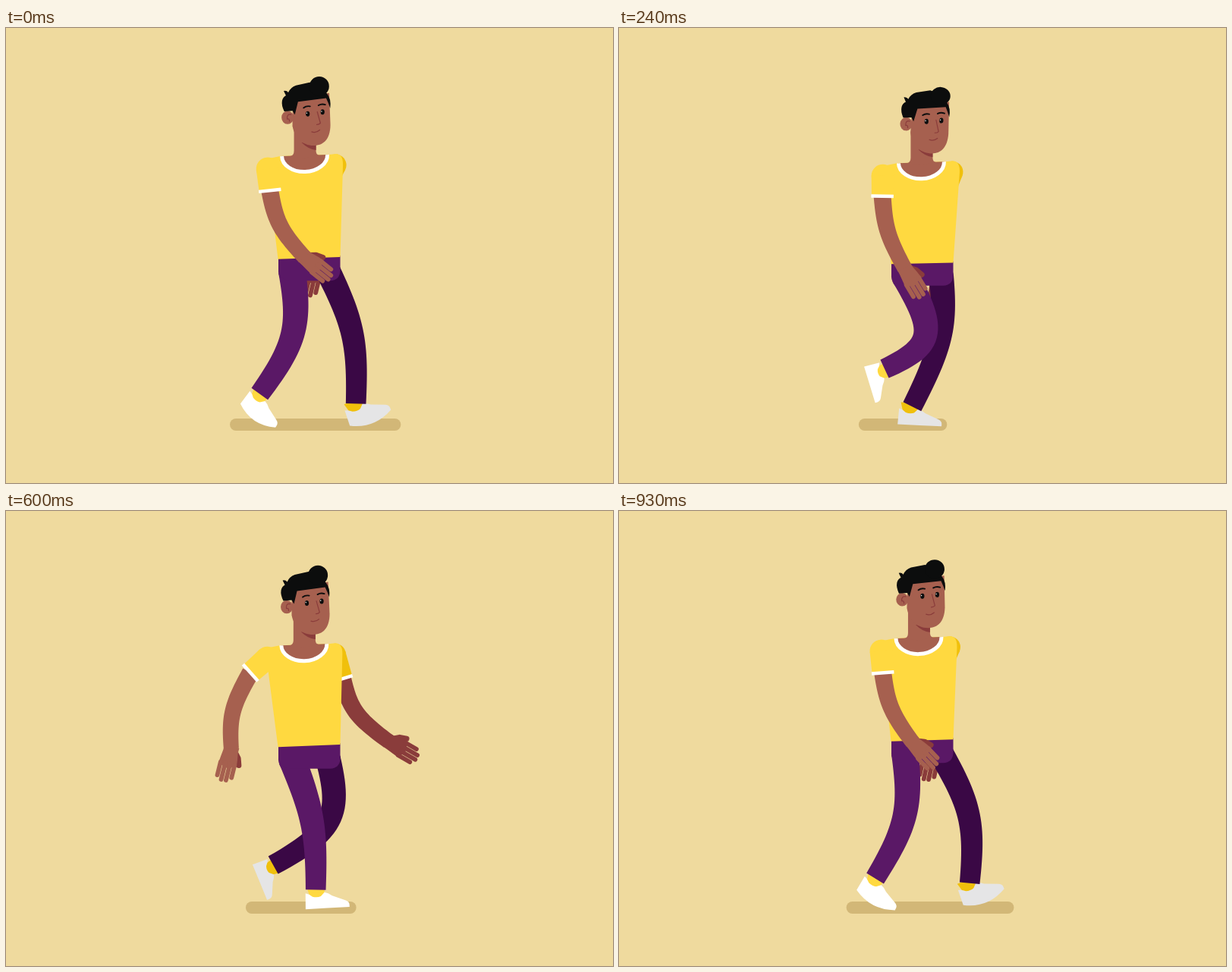
An HTML page with a canvas that plays this animation: 800x600 px, repeating every 0.96 s.

```html
<!DOCTYPE html>
<html lang="en">
<head>
<meta charset="utf-8">
<title>Walk cycle</title>
<style>
html, body { margin: 0; width: 800px; height: 600px; overflow: hidden; background: #efda9e; }
canvas { display: block; }
</style>
</head>
<body>
<canvas id="stage" width="800" height="600"></canvas>
<script>
const ctx = document.getElementById('stage').getContext('2d');
const LOOP = 960, HALF = LOOP / 2, STEP = 30, RAD = Math.PI / 180;
const C = {
  bg: '#efda9e', ground: '#d2b777', skin: '#a6604f', skinDark: '#8a3c3b',
  shirt: '#ffd940', shirtDark: '#f0c00c', pants: '#5a1866', pantsDark: '#3a0845',
  white: '#ffffff', shoeDark: '#e5e5e6', hair: '#0c0d0d'
};

// Cosine that reaches 1 at the time `peak`.
const wave = (t, period, peak) => Math.cos(2 * Math.PI * (t - peak) / period);

// Sum of harmonics of the loop; each pair holds a cosine and a sine weight.
function harmonics(t, mean, ...pairs) {
  const w = 2 * Math.PI * t / LOOP;
  return pairs.reduce((sum, [a, b], i) => sum + a * Math.cos((i + 1) * w) + b * Math.sin((i + 1) * w), mean);
}

// One leg's stride; both legs share it half a loop apart.
function stride(t) {
  return {
    knee: [
      harmonics(t, 397.6, [-23.2, 9.8], [2, -3.2], [1.2, 1.8]),
      harmonics(t, 405.5, [.7, -2.6], [-2, 4])
    ],
    ankle: [
      harmonics(t, 371.5, [-51, -7.7], [13.8, -4.8]),
      harmonics(t, 481, [-2.1, -23.1], [6.5, 4], [-2.9, 1.9])
    ],
    footAngle: harmonics(t, 22, [24.4, 30.4], [-16, 7.8], [3.6, -4.6]),
    bulge: Math.max(0, 8 * wave(t, HALF, 0))
  };
}

// One arm's pose from its swing (1 forward, -1 back) and the body bob.
function armPose(swing, bob) {
  const curve = (a, b, c) => a + b * swing + c * swing * swing;
  return {
    cuff: [curve(342.5, 13, -8), curve(217, 4, -3.5) + 5 * bob],
    elbow: [curve(339.5, 33, -8.5), curve(267, 1, -6) + 4.6 * bob],
    wrist: [curve(348.5, 53, 0), curve(321, -5, -16) + 4 * bob],
    handAngle: curve(84, -38, -18)
  };
}

const shift = ([x, y], dx) => [x + dx, y];

function fill(color, path) {
  ctx.fillStyle = color;
  ctx.fill(new Path2D(path));
}

function stroke(color, width, path, cap = 'round') {
  ctx.strokeStyle = color;
  ctx.lineWidth = width;
  ctx.lineCap = cap;
  ctx.lineJoin = 'round';
  ctx.stroke(new Path2D(path));
}

function ellipse(color, x, y, rx, ry = rx) {
  ctx.fillStyle = color;
  ctx.beginPath();
  ctx.ellipse(x, y, rx, ry, 0, 0, 2 * Math.PI);
  ctx.fill();
}

function local(x, y, degrees, draw) {
  ctx.save();
  ctx.translate(x, y);
  ctx.rotate(degrees * RAD);
  draw();
  ctx.restore();
}

// Outline of a tapered bent limb from a to b through mid, and its end direction.
function limb(a, mid, b, w0, w1) {
  const f = .85, steps = 28, left = [], right = [];
  const axes = [0, 1].map(i => {
    const k = (mid[i] - (.125 + .375 * (1 - f)) * (a[i] + b[i])) / (.75 * f);
    return [a[i], a[i] + f * (k - a[i]), b[i] + f * (k - b[i]), b[i]];
  });
  let dir;
  for (let s = 0; s <= steps; s++) {
    const u = s / steps, v = 1 - u, w = w0 + (w1 - w0) * u;
    const [x, y] = axes.map(p => v ** 3 * p[0] + 3 * v * v * u * p[1] + 3 * v * u * u * p[2] + u ** 3 * p[3]);
    const [dx, dy] = axes.map(p => v * v * (p[1] - p[0]) + 2 * v * u * (p[2] - p[1]) + u * u * (p[3] - p[2]));
    const len = Math.hypot(dx, dy) || 1;
    dir = [dx / len, dy / len];
    left.push([x - dir[1] * w, y + dir[0] * w]);
    right.unshift([x + dir[1] * w, y - dir[0] * w]);
  }
  return { path: 'M' + left.concat(right).join('L') + 'Z', dir };
}

function makeLeg(hip, pose, width) {
  const { path, dir } = limb(hip, pose.knee, pose.ankle, width, 13.3);
  const angle = pose.footAngle, cos = Math.cos(angle * RAD), sin = Math.sin(angle * RAD);
  const squash = 1 - .25 * Math.max(0, sin - .4);
  const joint = pose.ankle.map((v, i) => v + 10 * dir[i]);
  const footX = [[-13, -6], [-14, 15], [44, 13]].map(([x, y]) => joint[0] + x * squash * cos - y * sin);
  return { hip, path, width, joint, angle, squash, footX, bulge: pose.bulge };
}

function drawLeg(leg, pants, shoe, sock) {
  local(...leg.joint, leg.angle, () => {
    ctx.scale(leg.squash, 1);
    fill(sock, 'M-11-14L13-14L11 0L-7 1Z');
    fill(shoe, `M-13-6Q-8-5-4-1Q2 1 7-1L12-6Q17-5 22-1L39 6Q44 8 44 12L44 15Q15 ${15 + 2 * leg.bulge}-14 15Z`);
  });
  ellipse(pants, ...leg.hip, leg.width);
  fill(pants, leg.path);
}

function drawShadow(legs) {
  const xs = legs.flatMap(leg => leg.footX);
  const left = Math.min(...xs), right = Math.max(...xs), pad = (right - left) * .07;
  ctx.fillStyle = C.ground;
  ctx.beginPath();
  ctx.roundRect(left - pad, 515, right - left + 2 * pad, 16, 8);
  ctx.fill();
}

function hand(x, y, angle, skin) {
  local(x, y, angle, () => {
    stroke(C.skinDark, 7, 'M3-6L10-12L19-15');
    fill(skin, 'M-3-10L4-10Q14-12 22-12.5L26 0L22 12Q12 11 4 10L-3 9.5Z');
    stroke(skin, 5.8, 'M20-9.5L37-9.5M20-3.2L42-3.2M20 3.2L42.5 3.2M20 9.5L38 9.5');
  });
}

function arm(shoulder, { cuff, elbow, wrist, handAngle }, skin, shirt, width) {
  hand(...wrist, handAngle, skin);
  fill(skin, limb(cuff, elbow, wrist, 11.5, 10).path);
  const dx = cuff[0] - shoulder[0], dy = cuff[1] - shoulder[1], len = Math.hypot(dx, dy);
  local(...shoulder, Math.atan2(dy, dx) / RAD, () => {
    ellipse(shirt, 0, 0, width);
    fill(shirt, `M0 ${-width}L${len} ${-width + .8}L${len} ${width - .8}L0 ${width}Z`);
    stroke(C.white, 4.5, `M${len} ${-width + .3}L${len} ${width - .3}`, 'butt');
  });
}

function pelvis(hemL, hemR) {
  fill(C.pants, `M359 ${hemL - 2}L440.5 ${hemR - 2}L440.5 ${hemL + 15}
    Q440 ${hemL + 28} 427 ${hemL + 28.5}L374 ${hemL + 28.5}Q360 ${hemL + 26} 359 ${hemL + 15}Z`);
}

function torso(cx, cy, hemL, hemR) {
  fill(C.shirt, `M358.5 ${hemL}L${cx - 48} ${cy + 30}L${cx - 47} ${cy + 5}L${cx - 32} ${cy + 2}
    L${cx + 32} ${cy}L${cx + 41} ${cy - 1}Q${cx + 51} ${cy - 1} ${cx + 50.5} ${cy + 14}L440.5 ${hemR}Z`);
  const collar = `M${cx - 30} ${cy + 2}A30 21.5 -2 0 0 ${cx + 30} ${cy}`;
  fill(C.skin, collar + 'Z');
  fill(C.skin, `M${cx - 14} ${cy - 40}L${cx - 14} ${cy - 5}Q${cx - 14} ${cy + 1} ${cx - 19} ${cy + 2}
    L${cx} ${cy + 5}L${cx + 19} ${cy + .5}Q${cx + 15} ${cy} ${cx + 15} ${cy - 5}L${cx + 15} ${cy - 40}Z`);
  stroke(C.white, 5, collar, 'butt');
  fill(C.skinDark, `M${cx - 4} ${cy - 16}L${cx + 15} ${cy - 14}L${cx + 15} ${cy - 6}Q${cx + 5} ${cy - 7} ${cx - 4} ${cy - 16}Z`);
}

function eye(x, y, open) {
  if (open < .2) {
    stroke('#5d2d2a', 1.3, `M${x - 3.5} ${y - .3}Q${x} ${y + 1.2} ${x + 3.5} ${y - .6}`);
    return;
  }
  ellipse(C.hair, x, y, 2.6, 3.5 * open);
  ellipse(C.white, x - 1.3, y - .8 * open, .7, .8 * open);
}

// Drawn with the ear at (370, 117); the quiff lags behind the tilt.
function head(x, y, tilt, open) {
  local(x, y, tilt, () => {
    ctx.translate(-370, -117);
    fill(C.skin, 'M377 90L425 84L427 126C427 145 418 153.5 405 153.5C390 153.5 380 143 377 128Z');
    ellipse(C.skin, 370.5, 117, 8, 8.8);
    stroke(C.skinDark, 1.2, 'M375 113Q369 112 370 119Q373 118 373 122');
    fill(C.hair, `M380 113L377 108L366 109Q362 101 363 95Q364 90 368 88L365 82Q369 81 371 84
      Q374 77 381 74.5L399 70.5L414 74L422 85Q428 92 426.5 104Q424 97 421 91L384 96Z`);
    ellipse(C.hair, 411.5 + tilt * .4, 75 + tilt * .5, 13, 13 - tilt * .3);
    stroke(C.hair, 1.9, 'M391.5 104Q395 101 400 102M411 100.5Q415 98 420 99.5');
    eye(397, 111.8, open);
    eye(416.5, 109.3, open);
    stroke(C.skinDark, 1.2, 'M409.5 109L413.8 124Q412 126 409 126');
    stroke(C.skinDark, 1.2, 'M402.5 135.5Q408 137.5 413 133');
  });
}

function render(t) {
  const bob = wave(t, HALF, 180), chestBob = wave(t, HALF, 190), sway = wave(t, HALF, 310);
  const cx = 396 + 4 * sway, cy = 171.7 + 5.8 * chestBob;
  const hemL = 308 + 4.6 * bob, hemR = 305.7 + 4.4 * wave(t, HALF, 200);
  const open = Math.min(1, Math.max(0, (Math.abs(t - HALF) - 25) / 50));

  const swing = wave(t, LOOP, 85);
  const nearArm = armPose(swing, bob), farArm = armPose(-swing, bob);
  farArm.cuff = shift(farArm.cuff, 96);
  farArm.elbow = shift(farArm.elbow, 98);
  farArm.wrist = shift(farArm.wrist, 104);

  const farStride = stride(t + HALF + 20);
  farStride.knee = shift(farStride.knee, 38);
  farStride.ankle = shift(farStride.ankle, 26);
  const nearLeg = makeLeg([377, hemL + 16], stride(t), 18);
  const farLeg = makeLeg([424.5, hemL + 16], farStride, 16.5);

  ctx.fillStyle = C.bg;
  ctx.fillRect(0, 0, 800, 600);
  drawShadow([nearLeg, farLeg]);
  arm([cx + 41, cy + 13.5], farArm, C.skinDark, C.shirtDark, 14);
  drawLeg(farLeg, C.pantsDark, C.shoeDark, C.shirtDark);
  drawLeg(nearLeg, C.pants, C.white, C.shirt);
  pelvis(hemL, hemR);
  torso(cx, cy, hemL, hemR);
  head(374.3 + 6 * sway, 122.3 + 6 * bob, 2.3 + 2.8 * sway, open);
  arm([345 + (cx - 394) * .6, cy + 18.5], nearArm, C.skin, C.shirt, 15);
}

function frame() {
  render(Math.floor(performance.now() / STEP) * STEP % LOOP);
  requestAnimationFrame(frame);
}
frame();
</script>
</body>
</html>
```
